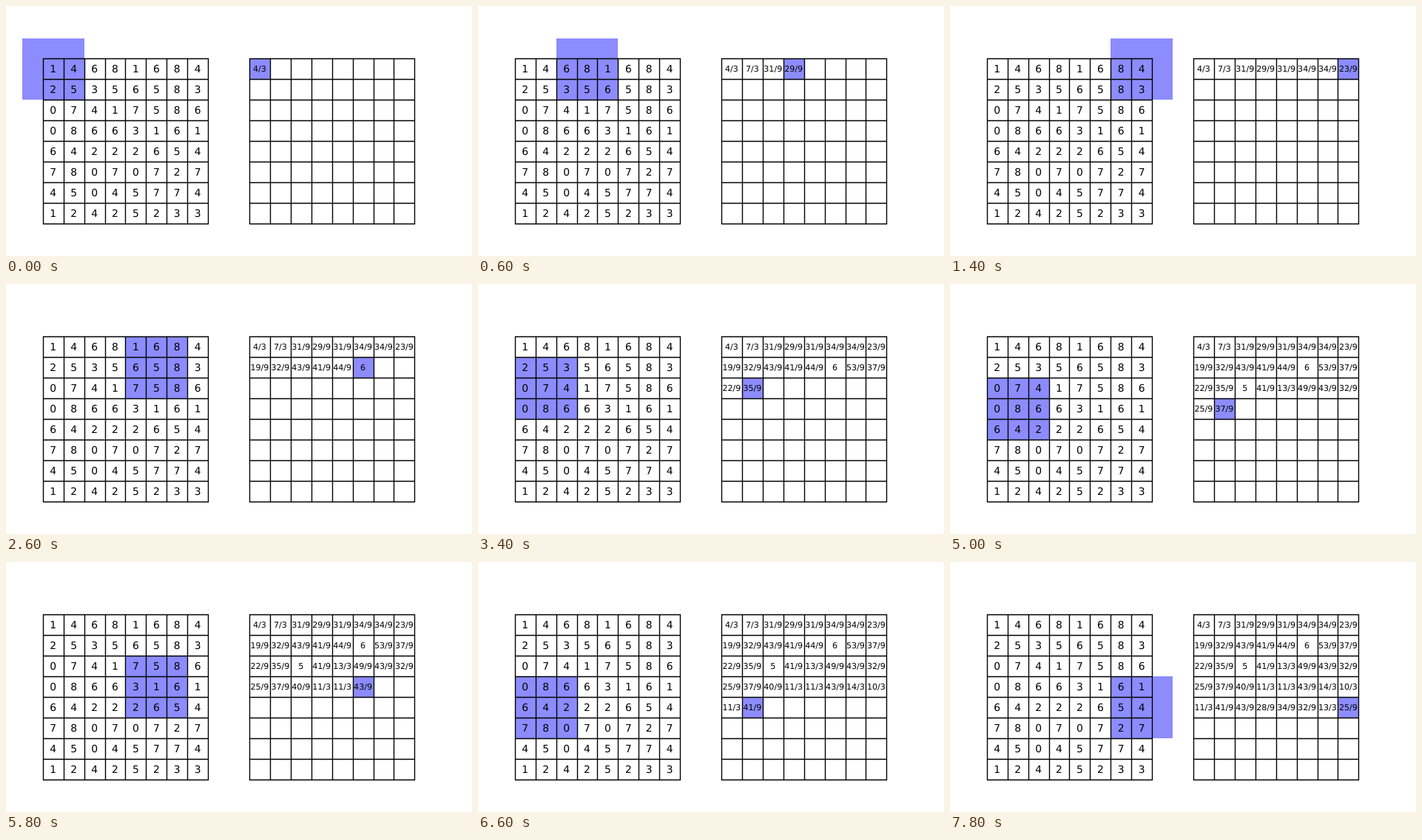
Write an HTML page that moves like this. It is 630 px wide and 339 px high and loops after 8000 ms.

```html
<!DOCTYPE html>
<html lang="en">
<head>
<meta charset="utf-8">
<title>3×3 mean filter</title>
<style>
html, body { margin: 0; width: 100%; height: 100%; overflow: hidden; background: #fff; }
svg { display: block; width: 100%; height: 100%; }
text { font-family: "DejaVu Sans", sans-serif; text-anchor: middle; text-rendering: geometricPrecision; }
.in { font-size: 13.89px; }
.out { font-size: 11.11px; }
rect { fill: #8c8cff; }
path { fill: none; stroke: #000; stroke-width: 1.39; stroke-linecap: square; }
</style>
</head>
<body>
<svg viewBox="0 0 630 339"></svg>
<script>
const N = 8, STEP = 200, LOOP = 8000;
const CELL = 27.92, LEFT = 49.78, TOP = 71.45, OUT = 10;
const input = [
  '14681684', '25356583', '07417586', '08663161',
  '64222654', '78070727', '45045774', '12425233'
].map(row => [...row].map(Number));

const svg = document.querySelector('svg');
const px = col => Math.round(LEFT + col * CELL);
const py = row => Math.round(TOP + row * CELL);

function add(tag, attrs, text = '') {
  const el = document.createElementNS('http://www.w3.org/2000/svg', tag);
  set(el, attrs);
  el.textContent = text;
  return svg.appendChild(el);
}

function set(el, attrs) {
  for (const k in attrs) el.setAttribute(k, attrs[k]);
}

function place(el, col, row, size) {
  const x = px(col), y = py(row);
  set(el, { x, y, width: px(col + size) - x, height: py(row + size) - y });
}

function grid(col) {
  let d = '';
  for (let i = 0; i <= N; i++) {
    d += `M${px(col) + .5} ${py(i) + .5}H${px(col + N) + .5}`;
    d += `M${px(col + i) + .5} ${py(0) + .5}V${py(N) + .5}`;
  }
  add('path', { d });
}

function label(text, col, row, cls, drop) {
  const x = LEFT + (col + .5) * CELL;
  const y = Math.round(TOP + (row + .5) * CELL) + drop;
  return add('text', { x, y, class: cls }, text);
}

const gcd = (a, b) => b ? gcd(b, a % b) : a;

// Zero-padded 3×3 mean as a reduced fraction
function mean(row, col) {
  let sum = 0;
  for (let r = row - 1; r <= row + 1; r++)
    for (let c = col - 1; c <= col + 1; c++)
      sum += input[r]?.[c] ?? 0;
  const g = gcd(sum, 9);
  return g === 9 ? `${sum / 9}` : `${sum / g}/${9 / g}`;
}

const kernel = add('rect', {}), target = add('rect', {});
grid(0);
grid(OUT);
input.forEach((row, r) => row.forEach((v, c) => label(v, c, r, 'in', 5)));

const results = Array.from({ length: LOOP / STEP }, (_, i) => {
  const r = Math.floor(i / N), c = i % N;
  return label(mean(r, c), OUT + c, r, 'out', 4);
});

function draw(ms) {
  const n = Math.floor(ms % LOOP / STEP);
  const row = Math.floor(n / N), col = n % N;
  place(kernel, col - 1, row - 1, 3);
  place(target, OUT + col, row, 1);
  results.forEach((el, i) => el.setAttribute('visibility', i <= n ? 'visible' : 'hidden'));
}

const start = performance.now();
function tick() {
  draw(performance.now() - start);
  requestAnimationFrame(tick);
}
tick();
</script>
</body>
</html>
```
